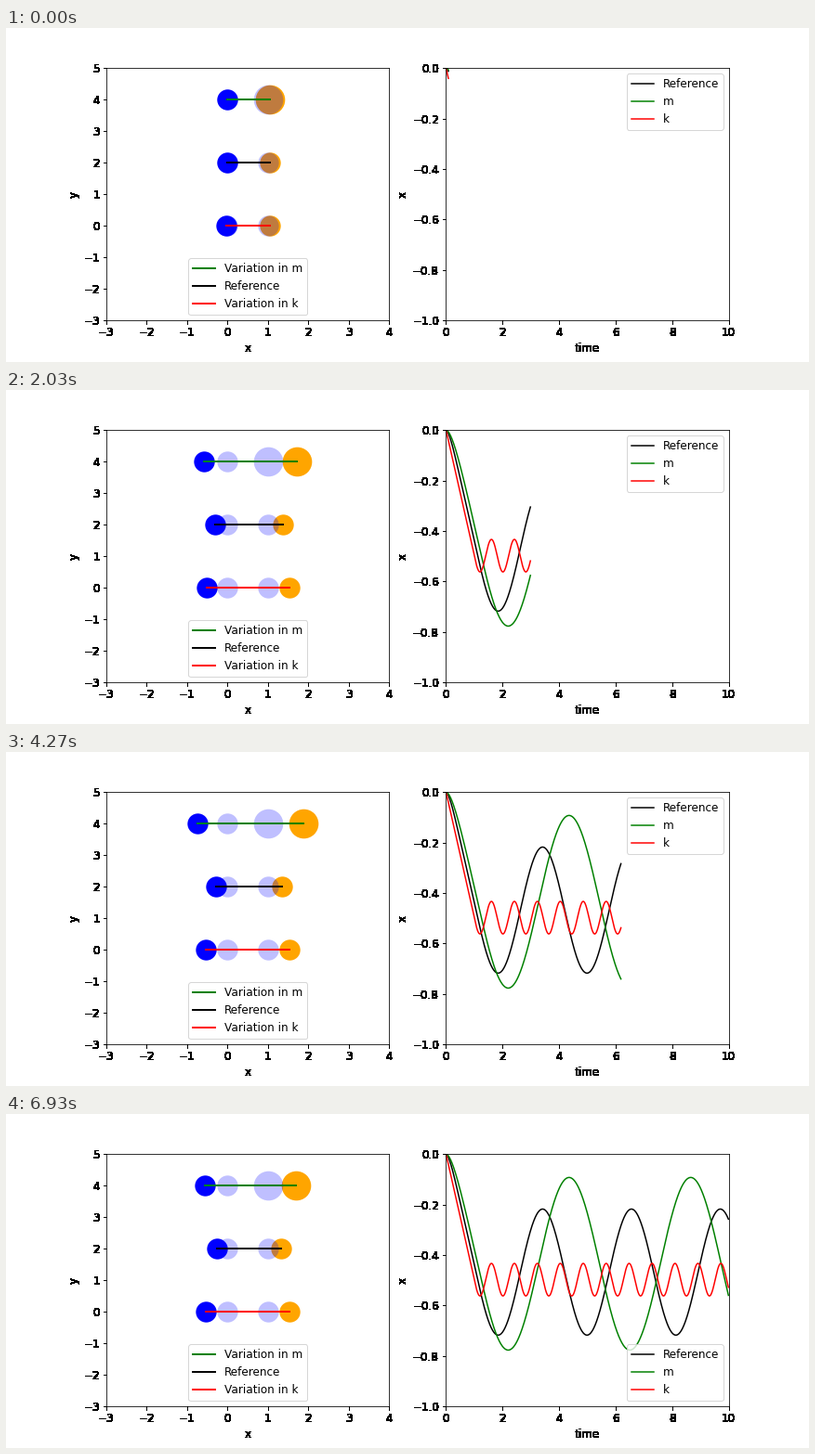
A matplotlib script for the animation above (7 s loop, 864 px wide and 360 px high).

```python
import numpy as np
import matplotlib.pyplot as plt
from matplotlib.animation import FuncAnimation

plt.rcParams.update({
    "font.family": "DejaVu Sans",
    "font.size": 12,
    "figure.subplot.bottom": 0.125,
})

FRAMES, INTERVAL = 100, 70
STEPS = 10            # samples per frame
SWITCH = 67           # frame at which the right legend moves down
SPEED = 0.5
SMALL, BIG = 500, 1000

t = np.arange(FRAMES * STEPS) * 0.01


def motion(omega, lag):
    """Two bodies fly apart, then oscillate about a spring length of 2."""
    start = 1 + lag
    swing = SPEED / omega * np.sin(omega * (t - start))
    free = t < start
    drag = lag * (1 - np.exp(-t / (2 * lag)))
    left = np.where(free, drag - SPEED * t, -0.5 + lag / 2 - swing)
    right = np.where(free, 1 + SPEED * t, 1.5 + lag / 2 + swing)
    return left, right


def harden(image, dpi):
    """Turn every touched pixel solid black."""
    image[..., :3] = 0
    image[..., 3] = image[..., 3] > 0
    return image, 0, 0


def setup(ax, xlim, ylim, xticks, yticks, xlabel, ylabel):
    ax.set(xlim=xlim, ylim=ylim, xticks=xticks, yticks=yticks,
           xlabel=xlabel, ylabel=ylabel)
    for axis in (ax.xaxis, ax.yaxis):
        axis.set_agg_filter(harden)


def disc(x, y, size, color, **kw):
    return ax1.scatter([x], [y], s=size, c=color, linewidths=0, **kw)


fig, (ax1, ax2) = plt.subplots(1, 2, figsize=(12, 5), dpi=72,
                               facecolor="white")
setup(ax1, (-3, 4), (-3, 5), range(-3, 5), range(-3, 6), "x", "y")
setup(ax2, (0, 10), (-1, 0), range(0, 11, 2), np.linspace(-1, 0, 6),
      "time", "x")


class Pair:
    def __init__(self, y, color, label, short, omega, lag, size=SMALL):
        self.y = y
        self.left, self.right = motion(omega, lag)
        self.blue = disc(0, y, SMALL, "blue")
        self.orange = disc(1, y, size, "orange")
        disc(0, y, SMALL, "blue", alpha=0.25)
        disc(1, y, size, "blue", alpha=0.25)
        self.rod, = ax1.plot([], [], color=color, lw=2, label=label)
        self.curve, = ax2.plot([], [], color=color, lw=1.5, label=short)

    def update(self, count):
        a, b = self.left[count - 1], self.right[count - 1]
        self.blue.set_offsets([(a, self.y)])
        self.orange.set_offsets([(b, self.y)])
        self.rod.set_data([a, b], [self.y, self.y])
        self.curve.set_data(t[:count], self.left[:count])


heavy = Pair(4, "green", "Variation in m", "m", np.sqrt(32 / 15), 0.13, BIG)
plain = Pair(2, "black", "Reference", "Reference", 2, 0.064)
stiff = Pair(0, "red", "Variation in k", "k", np.sqrt(60), 0.004)
pairs = (plain, heavy, stiff)
for order, pair in enumerate(pairs):
    pair.curve.set_zorder(2 + order / 10)

ax1.legend(loc="lower center")
curves = [pair.curve for pair in pairs]
upper = ax2.legend(handles=curves, loc="upper right")
ax2.add_artist(upper)
lower = ax2.legend(handles=curves, loc="lower right")


def draw(i):
    for pair in pairs:
        pair.update(STEPS * (i + 1))
    upper.set_visible(i < SWITCH)
    lower.set_visible(i >= SWITCH)
    return []


anim = FuncAnimation(fig, draw, frames=FRAMES, interval=INTERVAL,
                     init_func=lambda: draw(0), repeat=True, repeat_delay=0)
plt.show()
```
